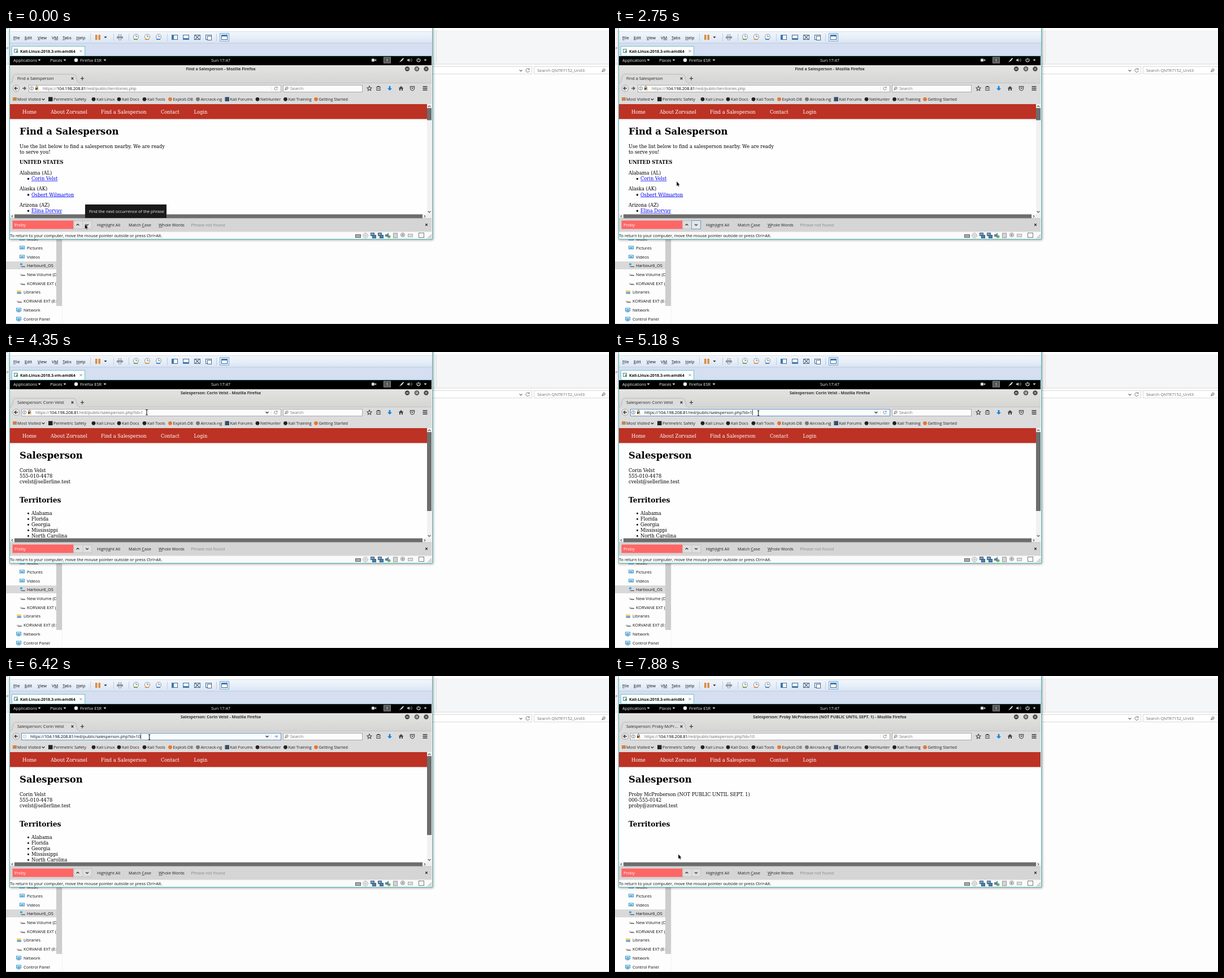
An HTML page with a canvas that plays this animation: 1067x525 px, repeating every 8 s.

```html
<!DOCTYPE html>
<html lang="en">
<head>
<meta charset="utf-8">
<title>Salesperson lookup</title>
<style>
html, body { margin: 0; width: 100%; height: 100%; overflow: hidden; background: #fff }
canvas { display: block }
</style>
</head>
<body>
<canvas id="stage" width="1067" height="525"></canvas>
<script>
const ctx = document.getElementById('stage').getContext('2d');
const LOOP = 8000;
const SANS = '"Open Sans", "Noto Sans", sans-serif';
const SERIF = '"DejaVu Serif", serif';
const CHROME = '#d5d5d5', INK = '#222', BLUE = '#3d7ab0';
const PERSON = 'Corin Velst', QUERY = 'Proby', HIDDEN = QUERY + ' McProberson (NOT PUBLIC UNTIL SEPT. 1)';
const HOST = '104.198.208.81';

function box(x, y, w, h, fill, stroke) {
  if (fill) { ctx.fillStyle = fill; ctx.fillRect(x, y, w, h); }
  if (stroke) { ctx.strokeStyle = stroke; ctx.lineWidth = 1; ctx.strokeRect(x + .5, y + .5, w - 1, h - 1); }
}
function shade(top, bottom, from, to) {
  const g = ctx.createLinearGradient(0, top, 0, bottom);
  g.addColorStop(0, from);
  g.addColorStop(1, to);
  return g;
}
function dot(x, y, r, fill, stroke, width = 1) {
  ctx.beginPath();
  ctx.arc(x, y, r, 0, 7);
  if (fill) { ctx.fillStyle = fill; ctx.fill(); }
  if (stroke) { ctx.strokeStyle = stroke; ctx.lineWidth = width; ctx.stroke(); }
}
function shape(x, y, d, fill, stroke, width = 1) {
  const p = new Path2D(d);
  ctx.save();
  ctx.translate(x, y);
  if (fill) { ctx.fillStyle = fill; ctx.fill(p); }
  if (stroke) { ctx.strokeStyle = stroke; ctx.lineWidth = width; ctx.stroke(p); }
  ctx.restore();
}
// y is the middle of the capitals; returns the x where the text ends
function text(str, x, y, { size = 7.4, color = INK, font = SANS, bold, align = 'left', under } = {}) {
  ctx.font = `${bold ? 'bold ' : ''}${size}px ${font}`;
  ctx.fillStyle = color;
  ctx.textAlign = align;
  const base = y + size * .36;
  ctx.fillText(str, x, base);
  if (under !== undefined) {
    const left = x + ctx.measureText(str.slice(0, under)).width;
    box(left, base + 1, ctx.measureText(str[under]).width, .6, color);
  }
  return x + ctx.measureText(str).width;
}
function clipped(x, y, w, h, draw) {
  ctx.save();
  ctx.beginPath();
  ctx.rect(x, y, w, h);
  ctx.clip();
  draw();
  ctx.restore();
}
const serif = (str, x, y, opts) => text(str, x, y, { size: 8.3, font: SERIF, color: '#000', ...opts });
const caret = (x, y, color = INK) => shape(x, y, 'M-2.5 -1.2H2.5L0 1.6Z', color);
const cross = (x, y, r, color = INK, w = 1.2) => shape(x, y, `M${-r} ${-r}L${r} ${r}M${r} ${-r}L${-r} ${r}`, null, color, w);
const chevron = (x, y, dir, color = INK) => shape(x, y, `M-2.4 ${-dir * 1.2}L0 ${dir * 1.2}L2.4 ${-dir * 1.2}`, null, color, 1.2);
const lens = (x, y, color) => { dot(x, y - .5, 2, null, color); shape(x, y, 'M-1.5 1L-3.5 3', null, color, 1.3); };
// value of the last [time, value] pair already reached
const at = (steps, t) => steps.reduce((v, s) => t >= s[0] ? s[1] : v, undefined);
const during = (t, ...spans) => spans.some(([a, b]) => t >= a && t < b);

function explorer() {
  box(0, 0, 1067, 525, '#fdfdfd');
  box(0, 0, 1067, 64, '#f5f6f7');
  box(0, 0, 1067, 4, '#fff');
  box(0, 63.5, 1067, 1, '#d9dadb');
  box(761, 4, 1, 58, '#dcdddf');
  box(0, 0, 3, 1, '#7ba3cf');
  text('P', 1, 36, { size: 6, color: '#555' });
  box(700, 68, 231, 14, '#fff', '#d9d9d9');
  chevron(911, 75.5, 1, '#666');
  shape(923, 75, 'M2.6 -1.8A3.2 3.2 0 1 0 3.2 .8M3 -3.6V-1.4H.8', null, '#666', .9);
  box(934, 68, 140, 14, '#fff', '#d9d9d9');
  text('Search QNTR7152_Unit3', 940, 75.5, { color: '#6d6d6d' });
  lens(1058, 75, '#555');

  box(89, 374, 10, 119, '#cdcdcd');
  box(99, 374, .6, 150, '#ececec');
  box(0, 524, 1067, 1, '#d4d6d8');
  box(0, 414, 89, 14, '#d9d9d9');
  const items = [['Music', 37, 374], ['Pictures', 37, 390], ['Videos', 37, 406], ['Harbour6_OS', 37, 421.5],
    ['New Volume (D:)', 37, 437], ['KORVANE EXT (E:)', 37, 453], ['Libraries', 31, 468.5],
    ['KORVANE EXT (E:)', 31, 484.5], ['Network', 31, 500], ['Control Panel', 31, 516]];
  clipped(0, 366, 89, 159, () => items.forEach(([name, x, y], i) => {
    text(name, x, y, { size: 7.45, color: '#111' });
    const ix = x - 8;
    if (i > 2 && i < 6 || i === 7) {
      shape(ix, y, 'M-5 0L-3 -1.5L5 1V2.6H-1Z', '#d4d6d8');
      shape(ix, y, 'M-4 1.2L-1 2.6H5V1.2Z', '#555');
      if (i === 3) box(ix - 4, y - 4, 4, 3, '#2fa5dc');
    } else if (i === 6) {
      box(ix - 4, y - 3, 8, 6, '#f0cf72');
      box(ix - 3, y, 7, 3, '#55a6d9');
    } else {
      box(ix - 5, y - 3.5, 9, 6, '#e8f3fa', '#348fc5');
      box(ix - 3, y - 1, 5, 2, '#3ba4d8');
      if (i > 7) box(ix - 3, y + 3, 5, 1, '#348fc5');
    }
  }));
}

function hostWindow() {
  ctx.save();
  ctx.shadowColor = 'rgba(0,0,0,.4)';
  ctx.shadowBlur = 4;
  ctx.shadowOffsetX = ctx.shadowOffsetY = 1;
  box(6, -5, 749, 380, '#fafafa');
  ctx.restore();
  box(6, 0, 748, 6, '#fcfdfe');
  box(6, 6, 748, 21, shade(6, 27, '#f3f7fc', '#d9e5f4'));
  box(6, 27, 748, 23, '#d6def1');
  box(6, 6, 748, .7, '#c9d4e0');
  box(6, 26.5, 748, .8, '#b9c5d8');
  [['File', 13], ['Edit', 33], ['View', 56], ['VM', 81], ['Tabs', 100], ['Help', 124.5]]
    .forEach(([s, x]) => text(s, x, 17, { under: s === 'VM' ? 1 : 0, color: '#111' }));

  box(158, 12, 3.5, 9, '#e08a3c');
  box(163.5, 12, 3.5, 9, '#e08a3c');
  caret(176, 16.5);
  [149, 190, 217, 285, 372].forEach(x => box(x, 10, .8, 13, '#b9c4d1'));
  box(198.5, 11.5, 6, 4, '#fff', '#8892a0');
  box(196, 15, 11, 3.5, '#8a95a3');
  box(199, 17.5, 5, 4, '#fff', '#8892a0');
  [['#6ea63d', 230], ['#e0963c', 250], ['#4c87bd', 270]].forEach(([c, x]) => {
    dot(x, 15.5, 4.5, '#f7f9fb', '#98a3ae', 1.2);
    shape(x, 15.5, 'M0 -3V0H2.5', null, '#667', .9);
    box(x - 4, 19, 7, 2, c);
  });
  [298, 318, 338, 358].forEach((x, i) => {
    box(x - 5, 12, 11, 9, '#f4f8fc', '#47698c');
    if (i === 0) box(x - 5, 12, 4, 9, BLUE);
    if (i === 1) box(x - 5, 18, 11, 3, BLUE);
    if (i === 2) cross(x + .5, 16.5, 4, '#47698c');
    if (i === 3) box(x - 2, 14, 8, 8, '#fff', '#47698c');
  });
  box(378, 9, 17, 15, '#dcebf9', '#83add6');
  box(381, 12, 11, 9, '#fff', '#47698c');
  box(381, 12, 11, 3, BLUE);

  box(10, 32, 130, 18, '#fff', '#6cc4c4');
  box(140, 49, 614, 1, '#6cc4c4');
  box(14, 37, 7, 7, '#e9f0f6', '#5f7d94');
  shape(18, 42, 'M0 -2.5L4 0L0 2.5Z', '#49a742');
  text('Kali-Linux-2018.3-vm-amd64', 25, 41.5, { size: 7, bold: true, color: '#111' });
  cross(132.5, 41, 2, '#778', .9);
  box(6, -2, 749, 377, null, '#55bdbb');
  text('To return to your computer, move the mouse pointer outside or press Ctrl+Alt.', 7, 368.5, { color: '#111' });
}

function tray(t) {
  box(618, 366, 10, 6, '#a9adb1', '#5d6265');
  if (during(t, [2220, 2350], [2490, 2620], [3560, 3680], [3820, 3950], [4220, 4350], [4500, 4620], [5050, 5180], [6560, 6690], [6950, 7080], [7620, 7750]))
    box(624, 369, 4, 4, '#3fc23f');
  dot(636, 368, 4.5, '#e3e3e3', '#bbb');
  dot(636, 368, 1.2, '#fff', '#aaa', .7);
  [649, 662].forEach(x => {
    box(x - 4, 363, 7, 6, '#68a7d3', '#456');
    box(x - 1, 367, 7, 6, '#3f82bd', '#456');
    if (during(t, [3560, 3680], [6950, 7080])) box(x + 3, 370, 3, 3, '#3fc23f');
  });
  shape(676, 368, 'M-5 -2H-2L1 -5V5L-2 2H-5Z', '#56829f');
  dot(678, 370, 2.5, '#63b253');
  box(685, 363.5, 8, 9, '#d2d5d8', '#999');
  dot(702, 367, 3.6, '#ddd', '#999');
  dot(702, 367, 1.5, '#888');
  box(711, 365, 9, 6, '#ddd', '#aaa');
  box(730, 363, 10, 9, '#fffef5', '#777');
  shape(753, 373, 'M-7 0L0 -7M-4 0L0 -4M-1.5 0L0 -1.5', null, '#888', .9);
}

function desktopBar() {
  box(7, 50, 746, 16, '#000');
  const white = { color: '#eee' };
  [['Applications', 13, 59], ['Places', 78, 104], ['Firefox ESR', 131, 175]].forEach(([s, x, end]) => {
    text(s, x, 57, white);
    caret(end, 57, '#eee');
  });
  dot(124, 57, 3.2, '#eee');
  text('Sun 17:47', 380, 57, { ...white, align: 'center' });
  box(647, 54.5, 5, 5, '#ddd');
  shape(652, 57, 'M0 0L3 -2V2Z', '#ddd');
  box(668, 51.5, 13, 11, '#555', '#888');
  text('1', 674.5, 57, { ...white, align: 'center' });
  shape(700, 57, 'M-4 4L-1 0L3 -4L4 -3L1 1Z', '#eee');
  shape(714, 57, 'M-4 -1.2H-2L0 -3V3L-2 1.2H-4Z', '#ccc');
  shape(714, 57, 'M1.5 -2Q3 0 1.5 2M3.5 -3Q5.5 0 3.5 3', null, '#999', .8);
  shape(730, 57, 'M-1.8 -2.4A3 3 0 1 0 1.8 -2.4M0 -4V0', null, '#eee', 1.1);
  caret(742, 57, '#eee');
}

function urlBar(t) {
  const hover = during(t, [4350, 7220]), focus = during(t, [4620, 6560]);
  const typed = during(t, [5730, 6810]);
  const textX = at([[0, 65], [3820, 62], [3950, 57], [4080, 52], [5730, 43], [6810, 52]], t);
  const left = typed ? 27 : textX - 25;
  box(left, 101, 487 - left, 13, '#fcfcfc', focus ? '#5b93c9' : '#aaa');
  dot(18, 107, 5.8, '#e8e8e8', '#999', .8);
  shape(18, 107, 'M3 0H-2.5M0 -2.8L-2.8 0L0 2.8', null, '#444', 1.5);
  if (t < 3820) {
    box(25, 102, 14, 11, '#e2e2e2');
    shape(32, 107, 'M-3 0H2.5M0 -2.8L2.8 0L0 2.8', null, '#555', 1.5);
  }
  const info = typed ? 33 : textX - 19.5;
  const tone = typed ? '#bbb' : '#666';
  dot(info, 107.2, 3.1, null, tone, .8);
  box(info - .4, 106.6, .9, 2.4, tone);
  box(info - .4, 105, .9, .9, tone);
  if (!typed) {
    const lock = textX - 10.5;
    shape(lock, 106, 'M-1.5 0V-1.5A1.5 1.5 0 0 1 1.5 -1.5V0', null, '#555', 1);
    box(lock - 2.5, 106, 5, 4, '#555');
    shape(lock + 1.5, 110.5, 'M-2.4 0L0 -4L2.4 0Z', '#f0b23a');
  }
  const path = '/red/public/' + at([[0, 'territories.php'], [3820, 'salesperson.php?id=1'], [5730, 'salesperson.php?id=10']], t);
  const gray = focus ? '#111' : '#6c6c6c', size = 7.3;
  let x = text('https://', textX, 107.2, { size, color: gray });
  x = text(HOST, x, 107.2, { size, color: '#000' });
  x = text(path, x, 107.2, { size, color: gray });
  if (focus) box(x + .2, 102.5, .8, 9.5, '#000');
  if (hover) chevron(462, 107.2, 1);
  box(469, 103, .6, 9, '#ddd');
  if (during(t, [5730, 6560])) shape(478, 107.2, 'M-3 0H2.5M0 -2.4L2.6 0L0 2.4', null, '#888', 1);
  else if (during(t, [3280, 3820], [6560, 6950])) cross(477.5, 107.2, 2.2, '#666');
  else shape(477.5, 107.2, 'M2 -1.8A2.7 2.7 0 1 0 2.6 .8M2.6 -3V-1H.6', null, '#777', .9);
}

function browserChrome(t) {
  box(7, 66, 746, 70, CHROME);
  box(7, 66, 746, 32, shade(66, 98, '#e3e3e1', '#d5d5d4'));
  const title = at([[0, 'Find a Salesperson'], [3820, 'Salesperson: ' + PERSON], [6810, 'Salesperson: ' + HIDDEN]], t);
  text(title + ' - Mozilla Firefox', 380, 72.5, { size: 7.1, bold: true, color: '#333', align: 'center' });
  [710, 727, 743.5].forEach((x, i) => {
    dot(x, 72.5, 4.2, '#4b4b4b');
    if (i === 0) box(x - 2, 72, 4, 1.2, '#eee');
    if (i === 1) box(x - 2, 70.5, 4, 4, null, '#eee');
    if (i === 2) cross(x, 72.5, 1.5, '#eee', 1);
  });

  box(7, 98, 746, 38, '#dcdcdc');
  box(7, 97.5, 746, .6, '#b5b5b5');
  shape(0, 0, 'M8 98Q11 98 12 91Q13 82 17 82H119Q124 82 125 91Q126 98 130 98Z', '#dcdcdc', '#aaa', .7);
  box(9, 97, 120, 2, '#dcdcdc');
  const loading = during(t, [3280, 3820], [6560, 6950]);
  const tab = during(t, [3280, 3820], [6560, 6810]) ? 'Connecting…'
    : at([[0, title], [6810, `Salesperson: ${QUERY} McPr...`]], t);
  if (loading) {
    const a = t / 150;
    dot(24, 91, 2.6, null, '#aaa', 1);
    dot(24 + 2.6 * Math.cos(a), 91 + 2.6 * Math.sin(a), 1, '#555');
  }
  clipped(15, 82, 96, 16, () => text(tab, loading ? 31 : 20, 89.5));
  cross(117.5, 89.5, 1.8);
  shape(135, 89.5, 'M-3.2 0H3.2M0 -3.2V3.2', null, '#333', 1.2);

  urlBar(t);
  box(490, 101, 141, 13, '#fcfcfc', '#aaa');
  lens(497, 107, '#666');
  text('Search', 503, 107.2, { color: '#777' });
  shape(643, 107, 'M0 -4L1.2 -1.3L4 -1L1.9 1L2.5 3.8L0 2.3L-2.5 3.8L-1.9 1L-4 -1L-1.2 -1.3Z', null, '#444', 1.1);
  box(655.5, 104, 7, 7, null, '#444');
  box(657, 103, 4, 2, '#444');
  box(657, 107, 4, .8, '#444');
  shape(679, 107, 'M-1.4 -4H1.4V0H4L0 4L-4 0H-1.4Z', '#1184dd');
  shape(699, 107, 'M-4.5 .3L0 -4L4.5 .3H3V4H1V1H-1V4H-3V.3Z', '#444');
  shape(719, 107, 'M-3.6 -3.4H3.6V0Q3.2 3.6 0 3.8Q-3.2 3.6 -3.6 0Z', null, '#444', 1.1);
  shape(719, 106.6, 'M-1.8 -1L0 .9L1.8 -1', null, '#444', 1.1);
  shape(741.5, 107, 'M-4 -3H4M-4 0H4M-4 3H4', null, '#333', 1.5);

  box(12, 123, 7, 6, '#c9854f');
  chevron(66, 126.5, 1);
  [['Most Visited', 20], ['Perimetric Safety', 84, '#222', 1], ['Kali Linux', 160, '#222'], ['Kali Docs', 205, '#222'],
    ['Kali Tools', 250, '#222'], ['Exploit-DB', 295.5, '#e8762c'], ['Aircrack-ng', 344.5, '#777'],
    ['Kali Forums', 396.5, '#35506b', 1], ['NetHunter', 450, '#222'], ['Kali Training', 499.5, '#222'],
    ['Getting Started', 553.5, '#e8762c']].forEach(([s, x, color, square]) => {
    text(s, x, 126.5, { size: 7.3 });
    if (square) box(x - 9, 122.5, 7.5, 7.5, color);
    else if (color) dot(x - 5, 126.3, 3.4, color);
  });
}

function territoryList(t) {
  serif('Find a Salesperson', 24, 183.4, { size: 16.5, bold: true });
  serif('Use the list below to find a salesperson nearby. We are ready', 24, 210);
  serif('to serve you!', 24, 220);
  serif('UNITED STATES', 24, 238.5, { bold: true });
  [['Alabama (AL)', PERSON], ['Alaska (AK)', 'Osbert Wilmarton'], ['Arizona (AZ)', 'Elina Dorvay']].forEach(([state, name], i) => {
    const y = 257 + i * 28.4;
    serif(state, 24, y);
    box(38, y + 9, 3, 3, '#000');
    const end = serif(name, 45, y + 10.2, { color: '#00e' });
    box(45, y + 14.2, end - 45, .7, '#00e');
    if (i === 0 && t >= 3280) {
      ctx.setLineDash([1, 1]);
      box(44, y + 5, end - 43, 11, null, '#55f');
      ctx.setLineDash([]);
    }
  });
}

function salesperson(lines, territories) {
  serif('Salesperson', 24, 183.4, { size: 16.5, bold: true });
  lines.forEach((s, i) => serif(s, 24, 210 + i * 10));
  serif('Territories', 24, 263, { size: 12.4, bold: true });
  territories.forEach((s, i) => {
    dot(39.5, 286.3 + i * 10, 1.5, '#000');
    serif(s, 45, 286 + i * 10);
  });
}

function page(t) {
  const view = at([[0, 0], [3950, 1], [6810, 2]], t);
  const right = view === 2 ? 753 : 745;
  box(7, 135, 746, 203, '#fefefe');
  box(7, 135, right - 7, 26.5, '#bc3224');
  [['Home', 29], ['About Zorvanel', 79], ['Find a Salesperson', 168], ['Contact', 274], ['Login', 332.5]]
    .forEach(([s, x]) => serif(s, x, 149, { color: '#fff' }));
  clipped(7, 135, right - 7, 195, () => {
    if (view === 0) territoryList(t);
    if (view === 1) salesperson([PERSON, '555-010-4478', 'cvelst@sellerline.test'],
      ['Alabama', 'Florida', 'Georgia', 'Mississippi', 'North Carolina']);
    if (view === 2) salesperson([HIDDEN, '000-555-0142', 'proby@zorvanel.test'], []);
    if (during(t, [3280, 3820], [6560, 6950])) {
      box(7, 318, 118, 13, '#e4e4e4', '#b5b5b5');
      text(`Waiting for ${HOST}…`, 10, 324.5);
    }
  });
  if (view < 2) {
    box(745, 135, 8, 196, '#f1f1f1');
    box(745, 142, 8, view ? 140 : 21.5, '#6d6d6d');
    chevron(749, 139, -1, '#555');
    chevron(749, 326, 1, '#555');
  }
  box(7, 330.5, 746, 7, '#efefef');
  box(15, 330.5, right - 23, 7, '#6d6d6d');
  shape(11, 334, 'M1 -2L-1 0L1 2', null, '#333', 1);
  shape(right - 4, 334, 'M-1 -2L1 0L-1 2', null, '#333', 1);
}

function findBar(t) {
  box(7, 338, 746, 23.5, CHROME);
  box(7, 337.5, 746, .7, '#b0b0b0');
  box(11.5, 341.5, 108, 15, '#ff6666');
  text(QUERY, 15, 349.3, { color: '#fff' });
  box(119.5, 341.5, 33, 15, '#dedede', '#c0c0c0');
  box(135.5, 342, .7, 14, '#bbb');
  if (during(t, [1510, 3280]))
    box(135, 341, 17, 16, during(t, [1510, 1640]) ? '#bfc6cc' : '#e3e7eb', '#6f9cc6');
  chevron(127, 349, -1);
  chevron(143.5, 349, 1);
  text('Highlight All', 161, 349.3, { under: 4 });
  text('Match Case', 217, 349.3, { under: 6 });
  text('Whole Words', 270, 349.3, { under: 0 });
  text('Phrase not found', 327.5, 349.3, { color: '#888' });
  cross(744, 349, 1.8);
  const tip = at([[0, 1], [1240, .4], [1370, 0]], t);
  if (tip) {
    ctx.globalAlpha = tip;
    box(140, 313, 144, 24, '#1a1a1a');
    text('Find the next occurrence of the phrase', 147, 325, { color: '#f4f4f4', size: 7.4 });
    ctx.globalAlpha = 1;
  }
}

const POINTERS = {
  arrow: (x, y) => shape(x, y, 'M0 0V8.4L1.9 6.8L3.2 9.6L4.6 9L3.3 6.2H5.8Z', '#000', '#fff', .35),
  hand: (x, y) => shape(x, y, 'M-1 0H1V4L5 5V8L4 11H-1L-4 7L-3 6L-1 7Z', '#000', '#fff', .5),
  beam: (x, y) => shape(x, y, 'M-1.7 -4.5H1.7M0 -4.5V4.5M-1.7 4.5H1.7', null, '#000', 1)
};
const POINTER_PATH = [
  [0, [139.6, 348]], [960, [141, 348.5]],
  [2490, [134, 328]], [2620, [118, 294]], [2750, [109, 272]], [2890, [104, 271]],
  [3010, [98, 270, 'hand']], [3140, [95, 269, 'hand']],
  [3560, [122, 262]], [3680, [185, 240]], [3820, [246, 222.5]], [3950, [246, 185]], [4080, [243, 150]], [4220, [241, 122]],
  [4350, [249, 107, 'beam']], [4500, [252.5, 108, 'beam']], [4890, [253.7, 108.5, 'beam']],
  [7220, [245, 150]], [7350, [228, 198]], [7480, [214, 230]], [7620, [176, 263]], [7750, [138, 294]], [7880, [112, 316]]
];

function render(now) {
  const t = now % LOOP;
  explorer();
  hostWindow();
  tray(t);
  desktopBar();
  browserChrome(t);
  page(t);
  findBar(t);
  const [x, y, kind = 'arrow'] = at(POINTER_PATH, t);
  POINTERS[kind](x, y);
}
const start = performance.now();
function tick() {
  render(performance.now() - start);
  requestAnimationFrame(tick);
}
tick();
</script>
</body>
</html>
```
